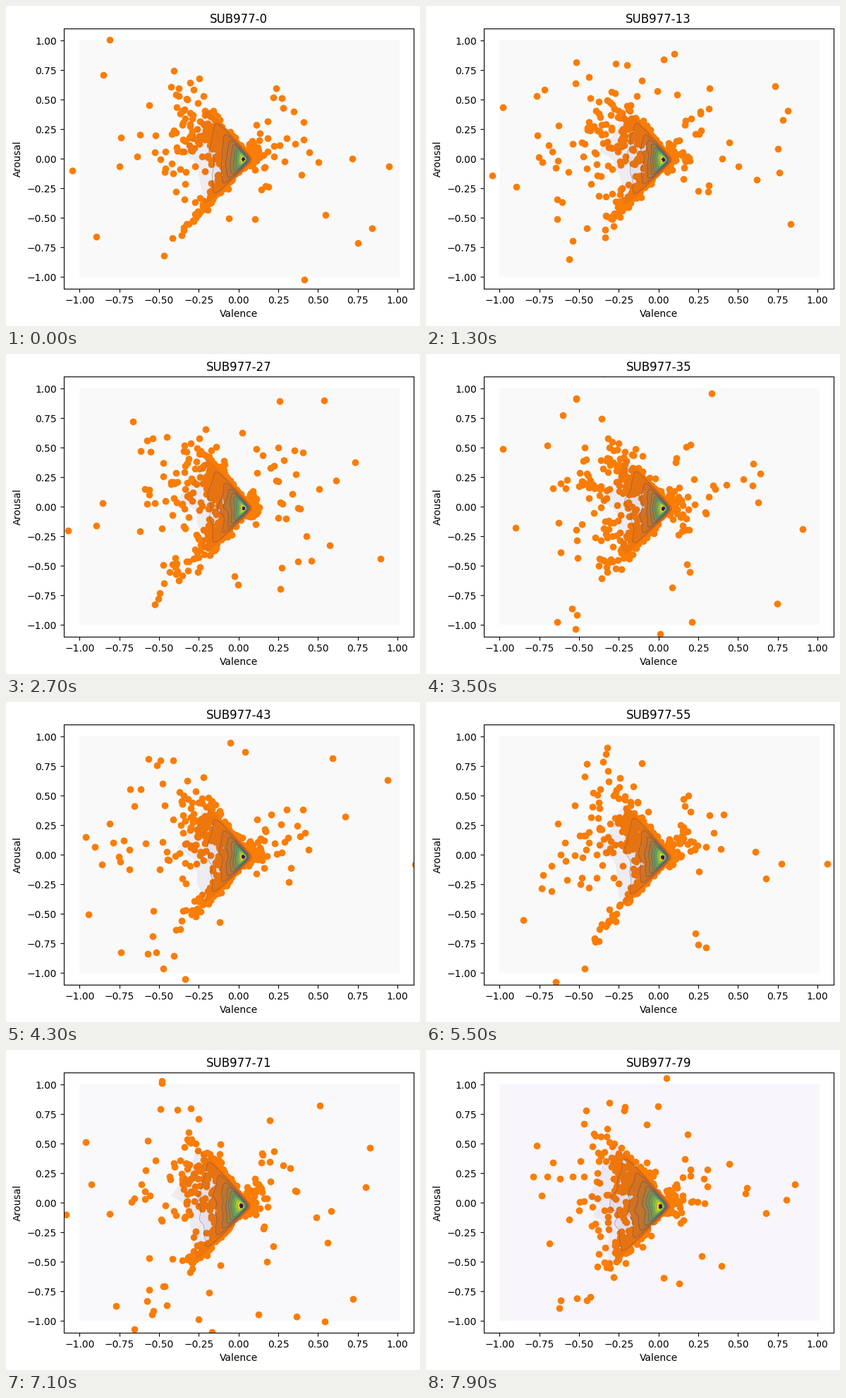
A matplotlib script for the animation above (8000 ms loop, 587 px wide and 455 px high).

```python
import numpy as np
import matplotlib.pyplot as plt
from matplotlib.animation import FuncAnimation
from matplotlib.patches import Rectangle

W, H, DPI = 587, 455, 100
FRAMES, INTERVAL = 80, 100
ORANGE = "#fa7d05"
UP, LOW = 0.53, 0.67  # how far each wedge edge recedes per unit of arousal

LEVELS = np.r_[0.035, np.linspace(0.1, 1.0, 10) ** 1.15, 1.1]
MIDS = (LEVELS[:-1] + LEVELS[1:]) / 2
FILLS = [(*plt.cm.viridis(min(m, 1))[:3], min(0.01 + 0.95 * m, 1)) for m in MIDS]
GX, GY = np.meshgrid(np.linspace(-0.6, 0.2, 161), np.linspace(-0.6, 0.6, 181))


def shape_at(i):
    """Slow drift of the wedge: tip, lower spread, depth, arm length, tint."""
    p = i / (FRAMES - 1)
    late = p ** 4
    tx = 0.078 - 0.012 * late
    ty = -0.005 - 0.025 * p
    low = 0.08 - 0.055 * np.cos(2 * np.pi * i / 55)
    return tx, ty, low, 0.058 + 0.03 * late, 0.09 + 0.035 * late, late ** 2


def cloud(i, rng):
    tx, ty, low, depth, *_ = shape_at(i)

    def arm(n, slope, reach, back, start=0.0, fuzz=0.04):
        t = start + rng.exponential(reach, n)
        blur = rng.normal(0, 1, n) * (0.006 + fuzz * t)
        x = tx - 0.015 - abs(slope) * t - rng.exponential(back, n) + blur
        return np.c_[x, ty + np.sign(slope) * t]

    def near(n, cx, cy, sx, sy):
        x = cx + rng.exponential(abs(sx), n) * np.sign(sx)
        return np.c_[x, rng.normal(cy, sy, n)]

    def ring(n, inner, outer):
        r, a = rng.uniform(inner, outer, n), rng.uniform(0, 2 * np.pi, n)
        return np.c_[r * np.cos(a), r * np.sin(a)]

    return np.vstack([
        arm(280, UP, 0.10, 0.6 * depth),
        arm(260, -LOW, 0.09, 0.4 * depth + 0.1 * low),
        arm(75, UP, 0.17, 0.09, 0.15, 0.12),
        arm(60, -LOW, 0.17, 0.4 * low, 0.18, 0.6 * low),
        near(120, tx, ty, -0.06, 0.03),
        near(45, -0.12, 0.14, -0.17, 0.14),
        near(16, -0.30, -0.05, -0.15, 0.22),
        near(35, tx - 0.02, 0.03, 0.035, 0.06),
        near(24, tx + 0.03, 0.14, 0.16, 0.20),
        ring(18, 0.5, 1.15),
    ])


def density(i, rng):
    tx, ty, _, depth, length, _ = shape_at(i)
    dy = np.hypot(GY - ty, 0.02) - 0.02
    e = tx - 0.03 - np.where(GY > ty, UP + 0.05, LOW) * dy - GX
    inside = np.maximum(e, 0)
    k, m = rng.uniform(-45, 45, (2, 4))
    phase = rng.uniform(0, 2 * np.pi, 4)
    wave = sum(np.sin(a * GX + b * GY + c) for a, b, c in zip(k, m, phase))
    rise = np.exp(-np.clip(e, -0.3, 0.3) / 0.010)
    fall = np.exp(inside / depth * (1 + 0.05 * wave))
    core = np.exp(-dy / length) / (rise + fall)
    haze = 0.08 * np.exp(-inside / 0.45 - abs(GY - 0.06) / 0.30) / (1 + rise)
    return core / core.max() + haze * (1 + 0.03 * wave)


fig = plt.figure(figsize=(W / DPI, H / DPI), dpi=DPI, facecolor="white")
ax = fig.add_axes([81.7 / W, 53 / H, 496 / W, 369.6 / H])
ax.set(xlim=(-1.1, 1.1), ylim=(-1.1, 1.1), xlabel="Valence", ylabel="Arousal")
ticks = np.arange(-1, 1.01, 0.25)
ax.set_xticks(ticks)
ax.set_yticks(ticks)
title = ax.set_title("SUB977-0")
base = ax.add_patch(Rectangle((-1, -1), 2.012, 2.006, lw=0, zorder=0))
dots = ax.scatter([], [], color=ORANGE, zorder=1)
layers = []


def draw(i):
    rng = np.random.default_rng(977 + i)
    while layers:
        layers.pop().remove()
    title.set_text(f"SUB977-{i}")
    tint = shape_at(i)[-1]
    base.set_facecolor(np.array([249 - tint, 249 - 3 * tint, 250]) / 255)
    dots.set_offsets(cloud(i, rng))
    f = density(i, rng)
    layers.append(ax.contourf(GX, GY, f, LEVELS, colors=FILLS, zorder=2))
    layers.append(ax.contour(GX, GY, f, LEVELS[1:-1], colors="#3f4068",
                             linewidths=0.5, alpha=0.35, zorder=2.1))
    return [title, base, dots]


anim = FuncAnimation(fig, draw, frames=FRAMES, interval=INTERVAL,
                     init_func=lambda: draw(0), repeat=True, repeat_delay=0)
plt.show()
```
